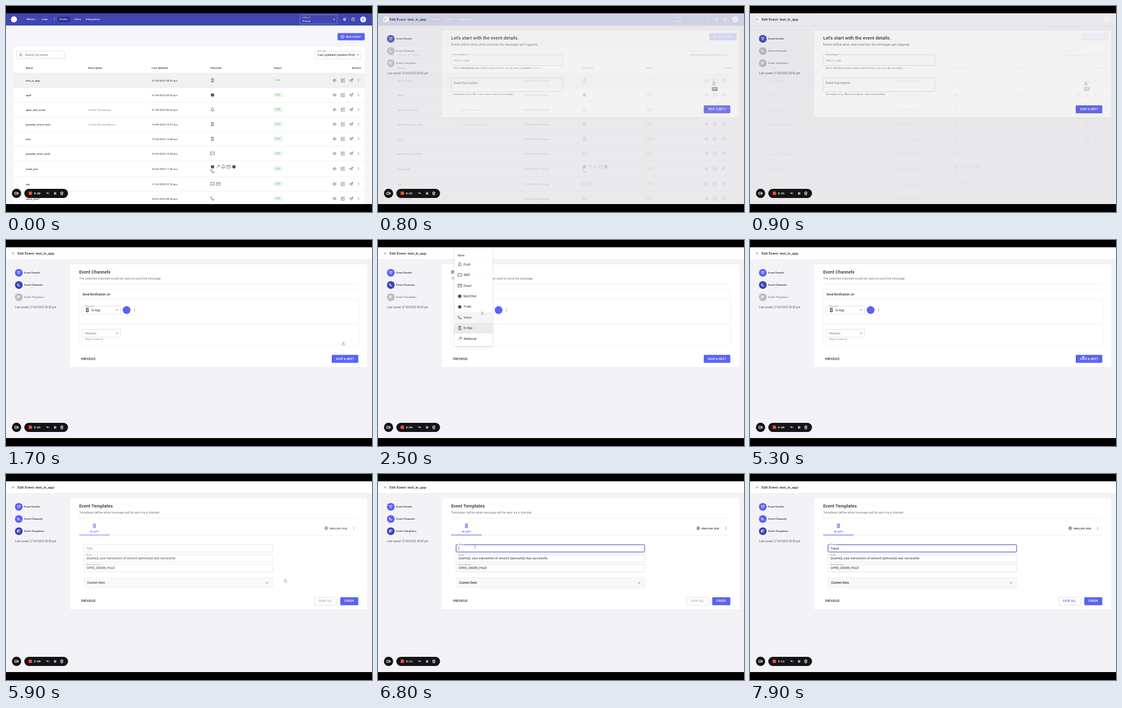
An HTML page that plays this animation: 600 px wide and 338 px high, repeating every 8000 ms.

```html
<!DOCTYPE html>
<html lang="en">
<head>
<meta charset="utf-8">
<title>Edit event</title>
<style>
html, body { margin: 0; width: 100%; height: 100%; overflow: hidden; background: #000; }
svg { display: block; width: 100vw; height: 100vh; }
text { font-family: Roboto, Arial, sans-serif; letter-spacing: .01em; white-space: pre; }
.cap { letter-spacing: .0333em; }
.btn { letter-spacing: .0286em; font-weight: 500; }
.mono { font-family: "DejaVu Sans Mono", monospace; font-weight: 700; letter-spacing: 0; }
</style>
</head>
<body>
<svg id="stage" viewBox="0 0 600 338">
  <defs>
    <filter id="soft" x="-10%" y="-20%" width="120%" height="150%">
      <feDropShadow dx="0" dy=".4" stdDeviation=".7" flood-opacity=".1"/>
    </filter>
    <filter id="lift" x="-20%" y="-20%" width="140%" height="140%">
      <feDropShadow dx="0" dy="1" stdDeviation="1.5" flood-opacity=".2"/>
    </filter>
  </defs>
</svg>
<script>
const LOOP = 8000;
const INK = '#2b2b30', GREY = '#77777d', PALE = '#a9a9ae', LINE = '#e4e4e9';
const BLUE = '#5a62f5', DARK = '#3d45b0';
const CHAT = 'MurlChat', TEAM = 'Trusk', VENDOR = 'Nolvi';

const text = (x, y, s, size = 4.375, fill = INK, more = '') =>
  `<text x="${x}" y="${(y + size * .355).toFixed(2)}" font-size="${size}" fill="${fill}" ${more}>${s}</text>`;
const bold = (x, y, s, size, fill) => text(x, y, s, size, fill, 'font-weight="500"');
const cap = (x, y, s, fill = GREY) => text(x, y, s, 3.75, fill, 'class="cap"');
const box = (x, y, x2, y2, fill, more = '') =>
  `<rect x="${x}" y="${y}" width="${x2 - x}" height="${y2 - y}" fill="${fill}" ${more}/>`;
const outline = (x, y, x2, y2, color = '#cacad0', w = .5) =>
  box(x, y, x2, y2, 'none', `rx="1.2" stroke="${color}" stroke-width="${w}"`);
const hline = (x, x2, y, color = LINE) => box(x, y - .25, x2, y + .25, color);
const dot = (x, y, r, fill, more = '') => `<circle cx="${x}" cy="${y}" r="${r}" fill="${fill}" ${more}/>`;
const group = (id, inner) => `<g id="${id}">${inner}</g>`;

const ICONS = {
  phone: 'M-1.7-3h3.4v6h-3.4zM-1.7-1.9h3.4M-1.7 1.7h3.4M-.6-.2h1.2',
  bell: 'M-2.7 1.6h5.4M-2 1.6v-2.3a2 2 0 0 1 4 0v2.3M-.6 2.7h1.2M0-2.7v-.5',
  sms: 'M-3 3v-5.6h6v4.4h-4.8zM-1.7-.4h.5M-.3-.4h.5M1.1-.4h.5',
  mail: 'M-3-2.3h6v4.6h-6zM-3-2l3 2.2 3-2.2',
  call: 'M-2.6-2.6h1.4l.5 1.6-.8.8a5 5 0 0 0 1.8 1.8l.8-.8 1.6.5v1.4c-3 .3-5.6-2.3-5.3-5.3z',
  hook: 'M-2.4 2.4l4.8-4.8M-.9-2.4h3.3v3.3',
  eye: 'M-3 0q3-4.2 6 0q-3 4.2-6 0zM-.9 0a.9.9 0 1 0 1.8 0a.9.9 0 1 0-1.8 0',
  edit: 'M.5-2.4h-3v5.2h5.2v-3M-.8.9l.2-1.2 2.8-2.8 1 1-2.8 2.8z',
  send: 'M-3 0l5.8-2.8-2 5.6-1.6-2zM-.8.8l3.6-3.6',
  search: 'M-2.2-.4a1.8 1.8 0 1 0 3.6 0a1.8 1.8 0 1 0-3.6 0M1 1l1.6 1.6',
  cross: 'M-1.7-1.7l3.4 3.4M1.7-1.7l-3.4 3.4',
  chevron: 'M-1.6-.8l1.6 1.6 1.6-1.6',
  filter: 'M-2.4-2h4.8l-2.4 4.2z',
  branch: 'M-1.7 2.2v-4.4M-2.6-1.2l.9-1 .9 1M-1.7-.4q3 0 3 2.4M.4 1.2l.9 1 .9-1',
  lines: 'M-2.4-2h4.8M-2.4-.4h4.8M-2.4 1.2h3.2M-2.4-2v4.6',
  globe: 'M-2.5 0a2.5 2.5 0 1 0 5 0a2.5 2.5 0 1 0-5 0M-2.5 0h5M0-2.5q-2.2 2.5 0 5q2.2-2.5 0-5',
  plus: 'M-2.6 0a2.6 2.6 0 1 0 5.2 0a2.6 2.6 0 1 0-5.2 0M-1.4 0h2.8M0-1.4v2.8',
  gear: 'M-1.5 0a1.5 1.5 0 1 0 3 0a1.5 1.5 0 1 0-3 0M0-2.6v1M0 2.6v-1M-2.3-1.3l.9.5M2.3 1.3l-.9-.5M-2.3 1.3l.9-.5M2.3-1.3l-.9.5',
  help: 'M-2.5 0a2.5 2.5 0 1 0 5 0a2.5 2.5 0 1 0-5 0M-.8-.6q0-.9.8-.9t.8.8q0 .5-.8 1M0 1.2v.3',
  undo: 'M-2.2-1.6v1.8h1.8M-2.1.1q2.2-2.3 4.3.9',
  pause: 'M-1-2v4M1-2v4',
  bin: 'M-2.3-1.7h4.6M-1.7-1.7l.3 4.2h2.8l.3-4.2M-.7-2.6h1.4M-.5-.4v1.6M.5-.4v1.6',
  camera: 'M-2.8-1.7h3.7v3.4h-3.7zM.9-.3l1.9-1v2.6l-1.9-1'
};
const icon = (name, x, y, color = '#55555c', w = .6) =>
  name === 'brand' ? dot(x, y, 2.8, color)
  : `<path transform="translate(${x} ${y})" d="${ICONS[name]}" fill="none" stroke="${color}" stroke-width="${w}" stroke-linejoin="round"/>`;
const more = (x, y) => [-1.8, 0, 1.8].map(d => dot(x, y + d, .55, '#55555c')).join('');
const arrow = (x, y, color = '#66666c') => `<path d="M${x - 1.5} ${y - .7}h3l-1.5 1.6z" fill="${color}"/>`;
const button = (x, y, x2, label, size = 4.7, fill = BLUE) =>
  box(x, y, x2, y + 13, fill, 'rx="1" filter="url(#soft)"') +
  text((x + x2) / 2, y + 6.5, label, size, '#fff', 'class="btn" text-anchor="middle"');
const notch = (x, y, s, w, color = GREY, bg = '#fff') => box(x - .7, y - 2, x + w, y + 2, bg) + cap(x, y, s, color);
const card = y2 => box(105, 40, 592, y2, '#fff', 'rx="1.2" filter="url(#soft)"');
const prev = y => text(123.3, y, 'PREVIOUS', 4.75, INK, 'class="btn"');

function listScene() {
  const rows = [
    ['test_in_app', '', '27-04-2022 04:02 pm', 'phone'],
    ['otp9', '', '27-04-2022 03:50 pm', 'brand'],
    ['apns_test_event', 'Create Transaction', '21-04-2022 05:36 pm', 'bell'],
    ['provider_errors_test', 'To test the provider er...', '19-04-2022 10:57 am', 'phone'],
    ['test', '', '19-04-2022 12:40 am', 'phone'],
    ['provider_error_test2', '', '29-03-2022 12:08 pm', 'sms'],
    [TEAM.toLowerCase() + '_test', '', '24-03-2022 11:45 am', 'brand hook bell mail brand call'],
    ['otp', '', '17-03-2022 07:53 pm', 'sms mail'],
    ['voice_test1', '', '24-02-2022 08:46 pm', 'call']
  ];
  let s = box(0, 12, 600, 325, '#f5f5fa') + box(0, 12, 600, 32, '#3f46b0') + dot(13, 22, 5, '#fff');
  s += box(85, 17.5, 105, 26.5, '#2b3192', 'rx="1.2"');
  [[34, 'Metrics'], [59, 'Logs'], [88, 'Events'], [112, 'Users'], [131, 'Integrations']]
    .forEach(([x, n]) => s += bold(x, 22, n, 4.2, '#fff'));
  s += box(79, 19.5, 79.5, 24.5, '#c5c8ee') + outline(482, 14.5, 543, 29.5, '#a9aee0');
  s += text(486, 19, VENDOR.toLowerCase() + '_2', 4, '#fff') + text(486, 25, 'Staging', 3.75, '#fff') + arrow(538, 22, '#fff');
  s += icon('gear', 555, 22, '#fff', .9) + icon('help', 569, 22, '#fff') + dot(585.5, 22, 4.8, '#eceef9');
  s += text(585.5, 22, 'D', 5, '#55555c', 'text-anchor="middle"');
  s += box(543.5, 44.5, 588, 56.3, BLUE, 'rx="1.2" filter="url(#soft)"') + icon('plus', 551.5, 50.3, '#fff');
  s += text(557, 50.3, 'NEW EVENT', 4.375, '#fff', 'class="btn"');
  s += box(12, 67, 588, 332, '#fff', 'filter="url(#soft)"') + outline(17, 74, 95.7, 86.5);
  s += icon('search', 24.5, 80.2) + text(31, 80.2, 'Search by name', 5.2, GREY);
  s += outline(506.5, 74, 582, 87) + notch(511, 74, 'Sort By', 13.5) + text(511, 80.3, 'Last updated (newest first)', 5) + arrow(576.5, 80.3);
  [[32.5, 'Name'], [135, 'Description'], [239, 'Last Updated'], [335, 'Channels'], [439, 'Status'], [567, 'Actions']]
    .forEach(([x, n]) => s += bold(x, 101.5, n));
  s += hline(12, 588, 110);
  let top = 110;
  rows.forEach(([name, about, date, kinds], i) => {
    const h = i === 6 ? 26 : 24, y = top + h / 2;
    if (!i) s += box(12, top, 588, top + h, '#f1f1f4');
    s += bold(32.5, y, name) + text(135, y, about, 4.375, GREY) + text(239, y, date);
    const list = kinds.split(' ');
    list.forEach((k, j) => s += icon(k, 338.5 + j % 5 * (list.length > 2 ? 8.8 : 9.6), y + (list.length > 5 ? (j < 5 ? -3.2 : 4) : 0)));
    s += box(438.7, y - 3.7, 453, y + 3.7, '#e6f6e7', 'rx="1"') + text(441.3, y, 'LIVE', 4, '#5fb868');
    s += icon('eye', 538.5, y) + icon('edit', 552, y) + icon('send', 566, y) + more(578, y);
    top += h;
    s += hline(12, 588, top);
  });
  return s;
}

function frameScene() {
  let s = box(0, 12, 600, 325, '#f3f3f7') + box(0, 12, 600, 32, '#fff', 'filter="url(#soft)"');
  s += icon('cross', 11.5, 22) + bold(19, 22, 'Edit Event: test_in_app', 5.85);
  ['filter', 'branch', 'lines'].forEach((k, i) => {
    const y = 53.8 + i * 20;
    s += dot(21, y, 6.4, PALE, `id="step${i}"`) + icon(k, 21, y, '#fff', .8);
    s += `<g id="word${i}">` + bold(30, y, ['Event Details', 'Event Channels', 'Event Templates'][i], 4.375, 'inherit') + '</g>';
  });
  return s + text(15, 110.5, '', 4.62, '#55555c', 'id="saved" font-style="italic"');
}

const details = () => card(183) + bold(120, 52, "Let's start with the event details.", 7.5) +
  text(120, 63, 'Events define what, when and how the messages get triggered.', 5, GREY) +
  outline(120, 80, 303, 97.5) + notch(124.3, 80, 'Event Name *', 24) + text(124.3, 89, 'test_in_app', 5, PALE) +
  cap(124.3, 101.3, 'Name should be unique (without special chars, try e.g. order_success)') +
  outline(120, 118, 303, 140.5) + text(124.3, 126, 'Event Description', 5, GREY) +
  cap(124.3, 144.5, 'Description (E.g. When user places order successfully)') +
  button(534, 163, 577.5, 'SAVE &amp; NEXT');

const channels = () => card(209) + bold(120, 52, 'Event Channels', 7.3) +
  text(120, 63, 'The selected channels would be used to send the message.', 5, GREY) +
  hline(120, 578, 72.3) + outline(120, 81, 578, 173, LINE) + bold(125.3, 89, 'Send Notification on', 4.9) +
  hline(120, 578, 97.5) + hline(120, 578, 138.7) +
  outline(125, 108.3, 187.7, 122) + notch(129.5, 108.3, 'Channel', 14.5) +
  icon('phone', 133.3, 115, INK, .8) + text(140, 115, 'In-App', 5) + arrow(182, 115) +
  dot(197.7, 115, 6.4, BLUE) + more(210.8, 115) +
  outline(125, 146.5, 187.7, 159.3) + text(129.5, 153, 'Channel', 5, GREY) + arrow(182, 153) +
  cap(129.5, 163, 'Select a channel') + prev(195) + button(534, 188.5, 577.5, 'SAVE &amp; NEXT');

const field = (y, label, value, w) => outline(128, y, 437, y + 12.3) + notch(132, y, label, w) + text(132, y + 6.3, value, 5);

const templates = () => card(222.5) + bold(120, 52, 'Event Templates', 7.3) +
  text(120, 63, 'Templates define what message will be sent via a channel.', 5, GREY) + hline(120, 578, 72.3) +
  prev(208.5) + outline(506, 202.3, 541.5, 215.3) +
  text(523.8, 208.7, 'SAVE ALL', 4.7, PALE, 'id="saveAll" class="btn" text-anchor="middle"') +
  button(548, 202.3, 577.5, 'FINISH') +
  group('form',
    icon('phone', 145, 85, BLUE, .9) + text(145, 94, 'IN-APP', 4.375, BLUE, 'class="btn" text-anchor="middle"') +
    hline(120, 578, 100.3) + box(120, 99.6, 170, 100.6, BLUE) +
    icon('globe', 525, 89) + text(530.5, 89, 'ENGLISH (EN)', 4.375, INK, 'class="btn"') + more(570, 89) +
    outline(128, 116, 437, 128) + text(132, 122, 'Title', 5, GREY, 'id="hint"') +
    group('focus', outline(128, 116, 437, 128, '#5158c8', 1) + notch(132, 116, 'Title', 8.5, DARK) +
      text(132, 122, '', 5, INK, 'id="typed"') + box(132, 119.2, 132.5, 125, INK, 'id="caret"')) +
    field(132.3, 'Body', '{{name}}, your transaction of amount {{amount}} was successful.', 9.5) +
    field(148.3, 'Click Action', 'OPEN_ORDER_PAGE', 20.5) +
    box(128, 170, 437, 187, '#f8f8fa', `rx="1.2" stroke="${LINE}" stroke-width=".5"`) +
    bold(133, 178.5, 'Custom Data', 4.9) + icon('chevron', 428, 178.5, INK, .7));

function channelMenu() {
  const items = [['Push', 'bell'], ['SMS', 'sms'], ['Email', 'mail'], [CHAT, 'brand'], [TEAM, 'brand'],
    ['Voice', 'call'], ['In-App', 'phone'], ['Webhook', 'hook']];
  let s = box(125.3, 15.5, 188, 174, '#fff', 'rx="1.2" filter="url(#lift)"') +
    box(125.3, 0, 188, 17.4, '#f6f6f8', 'id="hover"') + box(125.3, 136, 188, 153.4, '#ebebee') +
    text(130.5, 25, 'None', 4.8, INK, 'font-style="italic"');
  items.forEach(([n, k], i) => {
    const y = 40 + i * 17.42;
    s += icon(k, 134, y, '#4a4a50', .7) + text(140.3, y, n, 5);
  });
  return s;
}

function vendorMenu() {
  let s = box(191.5, 78, 285, 179, '#fff', 'rx="1.2" filter="url(#lift)"') + box(191.5, 106.3, 285, 123.7, '#ebebee') +
    text(197, 85.5, 'None', 5, INK, 'font-style="italic"') + cap(196.5, 98.8, 'Integrations', '#55555c');
  ['in_app', 'in', 'test_app', 'inapp'].forEach((n, i) => {
    const y = 115 + i * 17.4;
    s += dot(200.4, y, 4.1, BLUE) + text(209.3, y - 3.7, VENDOR, 5) + cap(209.3, y + 3.3, n);
  });
  return s;
}

const tooltip = box(547.3, 133, 556.7, 139.4, '#6b6b70', 'rx="1"') +
  text(552, 136.2, 'Edit', 3.4, '#fff', 'text-anchor="middle"');

const recorder = dot(17.3, 307.4, 7.6, '#141416') + icon('camera', 17.3, 307.4, '#fff', .9) +
  box(30, 300, 101.7, 315, '#141416', 'rx="7.5"') + box(37.2, 304.6, 42.6, 310, '#f0503c', 'rx=".8"') +
  text(46, 307.5, '', 4.4, '#fff', 'id="clock" class="mono"') +
  icon('undo', 69, 307.4, '#fff', .8) + icon('pause', 80.5, 307.4, '#fff', 1.2) + icon('bin', 91.5, 307.4, '#fff', .8);

const pointer = group('pointer',
  group('hand', '<path transform="scale(.85)" d="M-.9-2.6q.8-.7 1.1.2v1.8l1.9.6q.8.3.6 1.2l-.6 2.2h-3l-1.6-2q-.1-.8.7-.5l.9.5z" fill="#fff" stroke="#555" stroke-width=".5"/>') +
  group('beam', '<path d="M-.9-2.4h1.8M0-2.4v4.8M-.9 2.4h1.8" fill="none" stroke="#555" stroke-width=".5"/>'));

const stage = document.getElementById('stage');
stage.insertAdjacentHTML('beforeend',
  frameScene() + group('details', details()) + group('channels', channels()) + group('templates', templates()) +
  group('menuA', channelMenu()) + group('menuB', vendorMenu()) + group('list', listScene()) +
  group('dim', box(0, 12, 600, 325, '#1c1420')) + group('tip', tooltip) +
  pointer + recorder + box(0, 0, 600, 12, '#000') + box(0, 325, 600, 338, '#000'));

const el = {};
stage.querySelectorAll('[id]').forEach(n => el[n.id] = n);
const set = (id, name, value) => el[id].setAttribute(name, value);
const show = (id, a) => {
  set(id, 'opacity', a.toFixed(3));
  set(id, 'visibility', a > 0 ? 'visible' : 'hidden');
};
const ramp = (t, a, b) => Math.min(1, Math.max(0, (t - a) / (b - a)));
const ease = u => u * u * (3 - 2 * u);
const pulse = (t, a, b, c, d) => ease(ramp(t, a, b)) * (1 - ease(ramp(t, c, d)));

// time, x, y of the pointer at rest points
const PATH = [[0, 566, 128], [150, 566, 128], [450, 550.5, 127], [900, 550.5, 127], [1200, 553, 170], [1750, 553, 170],
  [2300, 171, 120], [2600, 171, 120], [2950, 150, 146], [3200, 150, 146], [3600, 195, 119.5], [4550, 195, 119.5],
  [5250, 546, 191], [5700, 546, 191], [6350, 159, 119.5], [8000, 159, 119.5]];

function pointerAt(t) {
  const i = Math.max(1, PATH.findIndex(p => p[0] > t));
  const a = PATH[i - 1], b = PATH[i], u = ease(ramp(t, a[0], b[0]));
  return [a[1] + (b[1] - a[1]) * u, a[2] + (b[2] - a[2]) * u];
}

function draw(t) {
  const page = t < 1600 ? 0 : t < 5500 ? 1 : 2;
  show('list', 1 - .94 * ease(ramp(t, 550, 880)) - .06 * ramp(t, 900, 1150));
  show('dim', .05 * pulse(t, 550, 800, 900, 1100));
  show('tip', pulse(t, 400, 500, 600, 1050));
  show('details', 1 - ramp(t, 1600, 1750));
  show('channels', ramp(t, 1550, 1700) * (1 - ramp(t, 5500, 5620)));
  show('templates', ramp(t, 5450, 5580));
  show('form', ease(ramp(t, 5750, 5950)));
  show('menuA', pulse(t, 2300, 2520, 3200, 3380));
  show('menuB', pulse(t, 3620, 3800, 4380, 4560));

  for (let i = 0; i < 3; i++) {
    set('step' + i, 'fill', i === page ? DARK : i < page ? BLUE : '#bcbcc0');
    set('word' + i, 'fill', i <= page ? INK : GREY);
  }
  el.saved.textContent = `Last saved: 27-04-2022 04:0${page ? 3 : 2} pm`;

  const [x, y] = pointerAt(t), beam = t > 6200;
  set('pointer', 'transform', `translate(${x.toFixed(2)} ${y.toFixed(2)})`);
  show('hand', beam ? 0 : ramp(t, 150, 250));
  show('beam', beam && t < 7000 ? 1 : 0);
  const row = Math.floor((y - 31.3) / 17.42);
  set('hover', 'y', 31.3 + Math.min(7, Math.max(0, row)) * 17.42);

  const focused = t >= 6450;
  const n = t < 7100 ? 0 : Math.min(5, 1 + Math.floor((t - 7100) / 170));
  const typed = 'Trans'.slice(0, n);
  show('focus', focused ? 1 : 0);
  show('hint', focused ? 0 : 1);
  if (el.typed.textContent !== typed) el.typed.textContent = typed;
  set('caret', 'x', 132 + (n ? el.typed.getComputedTextLength() : 0));
  set('saveAll', 'fill', n ? BLUE : PALE);

  el.clock.textContent = '0:' + String(Math.floor(t * .00162)).padStart(2, '0');
}

function tick() {
  draw(performance.now() % LOOP);
  requestAnimationFrame(tick);
}
tick();
</script>
</body>
</html>
```
